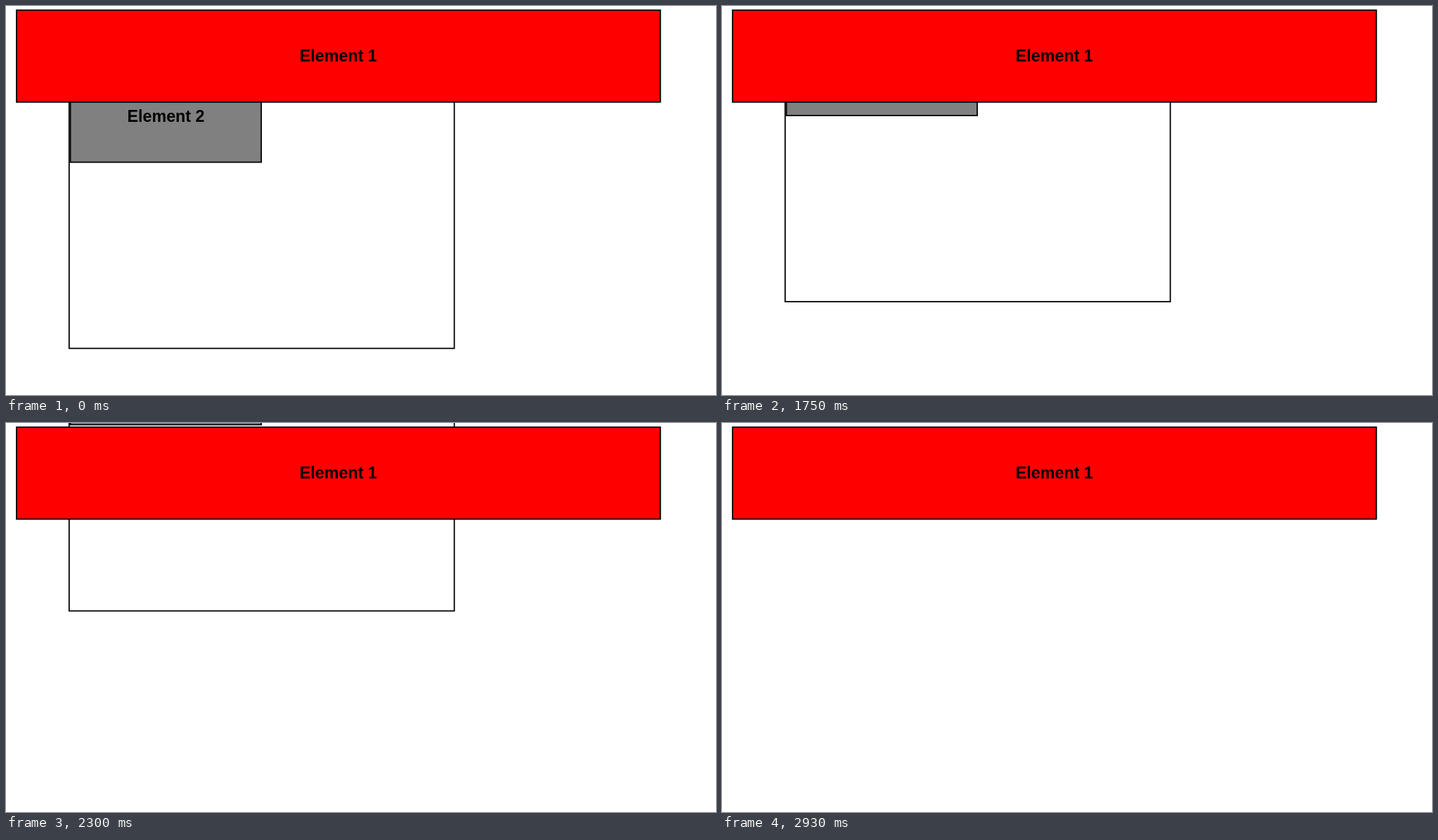
Recreate the animation shown at these times as an HTML page. Size 1010 by 554 pixels, loop 4020 ms.

```html
<!DOCTYPE html>
<html lang="en">
<head>
<meta charset="utf-8">
<title>Scrolling under a fixed element</title>
<style>
  html, body { margin: 0; width: 100%; height: 100%; overflow: hidden; background: #fff; }
  svg { display: block; width: 1010px; height: 554px; }
  rect { stroke: #000; stroke-width: 1.8; }
  text { font: bold 23.3px "Liberation Sans", Arial, sans-serif; text-anchor: middle; }
</style>
</head>
<body>
<svg viewBox="0 0 1010 554">
  <g id="page">
    <rect x="89.8" y="89.8" width="547.9" height="397.8" fill="#fff"/>
    <rect x="91.6" y="91.6" width="271.5" height="130.9" fill="#808080"/>
    <text x="227.5" y="164.8">Element 2</text>
  </g>
  <rect x="15" y="5.9" width="915.8" height="130.9" fill="#f00"/>
  <text x="472.8" y="79">Element 1</text>
</svg>
<script>
  const LOOP = 4020;
  const SCROLL_START = 1520;
  const STEP = 77.85;
  const page = document.getElementById("page");

  // [step, scroll offset]; the speed is constant between neighbours
  const keys = [[-1, 0], [3, 66.5], [7, 126], [10, 220], [12, 293], [18, 490]];

  // The page moves in steps that fall on whole hundredths of a second.
  function stepAt(time) {
    const elapsed = Math.floor((time - SCROLL_START) / 10) * 10;
    const step = Math.floor((elapsed + 5) / STEP);
    return Math.min(18, Math.max(-1, step));
  }

  function scrollAt(step) {
    const next = Math.max(1, keys.findIndex(([at]) => at >= step));
    const [[s0, y0], [s1, y1]] = keys.slice(next - 1, next + 1);
    return y0 + (y1 - y0) * (step - s0) / (s1 - s0);
  }

  function draw(time) {
    page.setAttribute("transform", `translate(0 ${-scrollAt(stepAt(time))})`);
  }

  const begin = performance.now();
  function tick() {
    draw((performance.now() - begin) % LOOP);
    requestAnimationFrame(tick);
  }
  tick();
</script>
</body>
</html>
```
